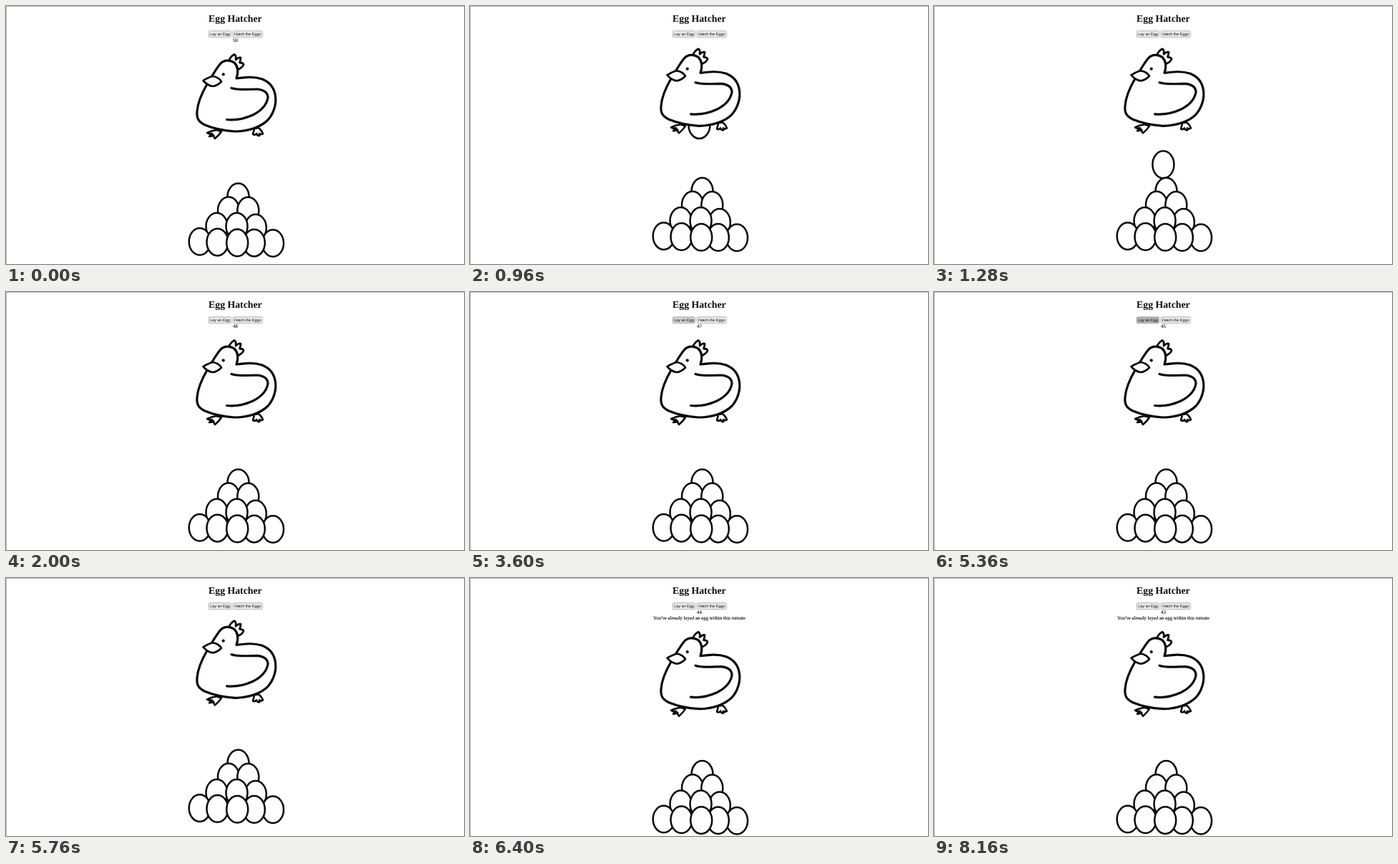
An HTML page for the animation above (8.24 s loop, 640 px wide and 360 px high).

```html
<!DOCTYPE html>
<html lang="en">
<head>
<meta charset="utf-8">
<title>Egg Hatcher</title>
<style>
  html, body { margin: 0; width: 100%; height: 100%; overflow: hidden; background: #fff; }
  svg { display: block; width: 640px; height: 360px; }
  text { text-anchor: middle; fill: #0c0c0c; text-rendering: geometricPrecision; }
  .serif { font: 6.86px "Liberation Serif", "Times New Roman", serif; stroke: #0c0c0c; stroke-width: .12; }
  .title { font: bold 13.8px "Liberation Serif", "Times New Roman", serif; }
  .label { font: 5.45px "Liberation Sans", Arial, sans-serif; }
  .button { stroke: #8f8f9d; stroke-width: .6; }
  .ink { fill: #fff; stroke: #080808; stroke-linecap: round; stroke-linejoin: round; }
  .line { fill: none; }
</style>
</head>
<body>
<svg viewBox="0 0 640 360">
  <rect width="640" height="360" fill="#fff"/>
  <path d="M0 .5H640M.5 0V360" stroke="#b4b4b4" fill="none"/>
  <text class="title" x="320.4" y="21.6">Egg Hatcher</text>
  <rect class="button" id="lay" x="283.2" y="34.7" width="31.4" height="9" rx="1.6"/>
  <rect class="button" x="316.9" y="34.7" width="41.4" height="9" rx="1.6" fill="#e9e9ed"/>
  <text class="label" x="299" y="41.4">Lay an Egg</text>
  <text class="label" x="337.6" y="41.4">Hatch the Eggs</text>
  <text class="serif" id="counter" x="320.4" y="49.8"></text>
  <text class="serif" id="message" x="320.4" y="57.6">You've already layed an egg within this minute</text>
  <g id="scene" class="ink">
    <ellipse id="egg" cx="320.4" rx="15" ry="19" stroke-width="2.5"/>
    <g stroke-width="3.2">
      <path stroke-width="2.6" d="M294 173Q287 174 281 177Q284 179 288 178Q285 180 284 182Q288 182 290 180Q290 183 292 185Q298 180 301 175Z"/>
      <path stroke-width="2.6" d="M347 171Q346 176 345 179Q348 181 350 178Q351 181 354 181Q355 180 354 178Q357 180 359 178Q357 173 353 170Z"/>
      <path stroke-width="2.8" d="M311 77Q314 70 319 67.500Q322 69 321 75Q325 71 328 72Q328 75 326.500 79Q331 79 332 81.500Q331 86 323 89Z"/>
      <path d="M322 101C325 92 324 84 319 79C313 75 305 75 300 80C293 88 288 98 281 109C274 121 268 134 267 147C266 158 270 162 278 166C290 171 305 174 320 175C338 175 356 169 366 159C374 150 378 137 376.500 126C375 114 368 106 358 102C346 98 334 99.500 322 101Z"/>
      <path stroke-width="2.7" d="M275.500 104C280 101 284 99.500 288 98C294 98 299 102 301 105.500C297 109.500 294 111.500 289 112C284 111.500 279 108 275.500 104Z"/>
      <path class="line" d="M315 114.500C326 118 340 116 351 116C360 117 366 121 366 128C364 139 355 147 345 152C334 157 322 160 308.500 158.500"/>
      <circle cx="303.700" cy="95.400" r="2.100" fill="#080808" stroke="none"/>
    </g>
    <g id="pile" stroke-width="2.5"></g>
  </g>
</svg>
<script>
  const LOOP = 8240, LINE = 7.7;
  const byId = id => document.getElementById(id);
  const [lay, counter, message, scene, egg, pile] =
    ["lay", "counter", "message", "scene", "egg", "pile"].map(byId);

  // Back to front, top row first.
  const stack = [
    [324.5, 266.2], [311, 285.3], [338.3, 285.5],
    [294.5, 307.5], [348.8, 309.5], [322.5, 307.5],
    [270.7, 328.8], [295.5, 329.6], [373, 331], [346.8, 330.6], [323.2, 330.4]
  ];
  pile.innerHTML = stack.map(([x, y]) =>
    `<ellipse cx="${x}" cy="${y}" rx="15" ry="18.8"/>`).join("");

  const firstClick = 720, firstTick = 1760, secondClick = 5440, secondTick = 6320;
  const ticks = [560, firstTick, 2880, 4000, 5120, secondTick, 7440];
  const within = (t, from, to) => t >= from && t < to;

  function buttonColor(t) {
    if (within(t, 400, firstClick) || within(t, 4320, secondClick)) return "#b1b1b9";
    if (within(t, 80, 400) || within(t, 3200, 4320)) return "#d0d0d7";
    return "#e9e9ed";
  }

  function render(t) {
    const laying = within(t, firstClick, firstTick);
    const cleared = laying || within(t, secondClick, secondTick);
    const warned = t >= secondTick;
    const shift = cleared ? -LINE : warned ? LINE : 0;

    lay.setAttribute("fill", buttonColor(t));
    counter.textContent = cleared ? "" : 50 - ticks.filter(at => t >= at).length;
    message.style.display = warned ? "" : "none";
    scene.setAttribute("transform", `translate(0 ${shift})`);

    // The egg drops from behind the hen and rests on the pile.
    const fall = Math.min(1, Math.max(0, (t - firstClick) / 480));
    egg.style.display = laying ? "" : "none";
    egg.setAttribute("cy", 155 + 74 * fall * fall);
  }

  const start = performance.now();
  function tick() {
    render((performance.now() - start) % LOOP);
    requestAnimationFrame(tick);
  }
  render(0);
  requestAnimationFrame(tick);
</script>
</body>
</html>
```
